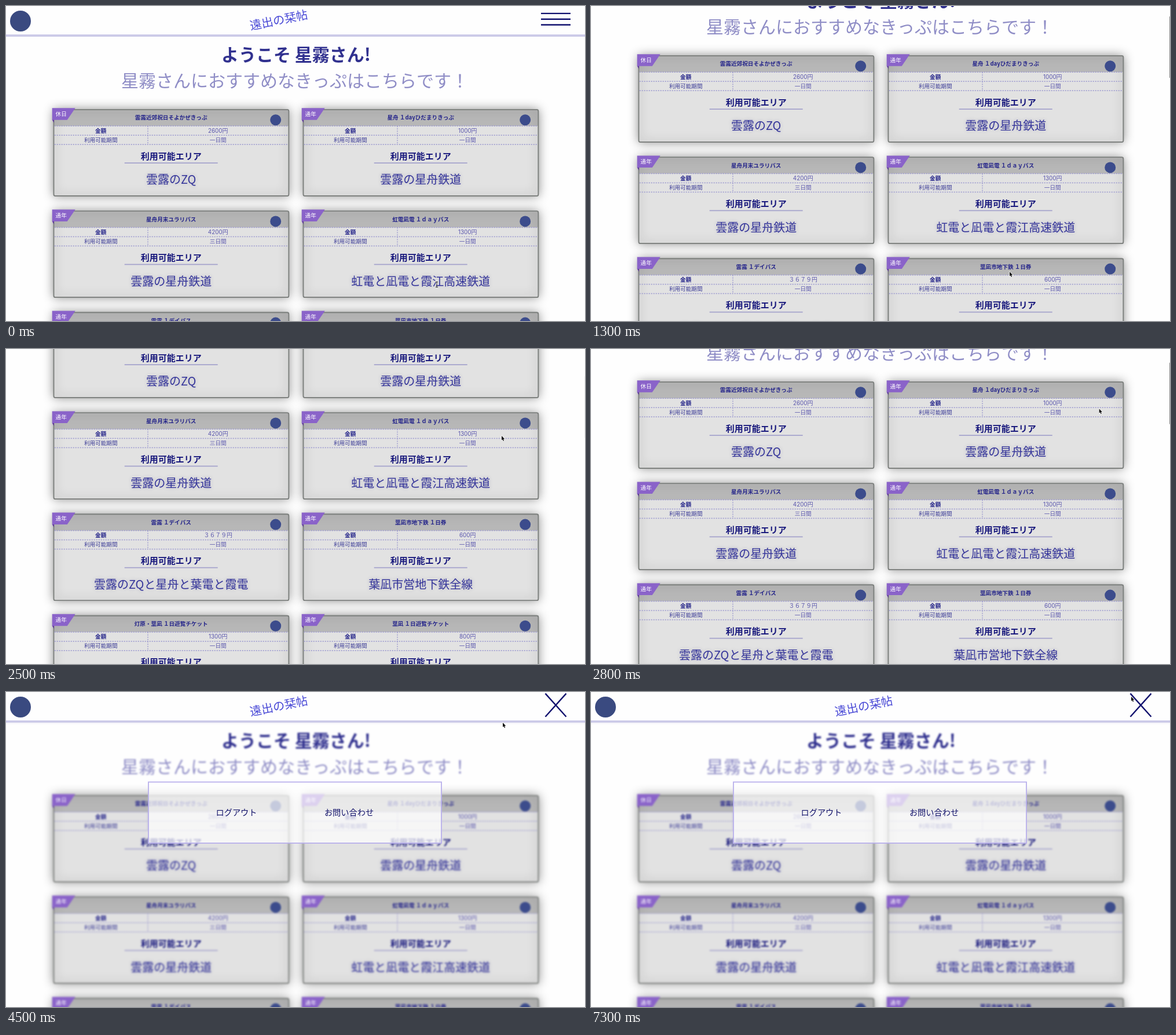
Recreate the animation shown at these times as an HTML page with a canvas. Size 1000 px wide and 544 px high, loop 7.4 s.

```html
<!DOCTYPE html>
<html lang="ja">
<head>
<meta charset="utf-8">
<title>きっぷ案内</title>
<style>
html, body { margin: 0; width: 100%; height: 100%; overflow: hidden; background: #fefefe; }
canvas { display: block; width: 1000px; height: 544px; }
</style>
</head>
<body>
<canvas id="stage" width="1000" height="544"></canvas>
<script>
const W = 1000, H = 544, LOOP = 7400, STEP = 100;
const PAGE_H = 900, CONTENT_H = 2800, HEADER_H = 54;
const FONT = '"Noto Sans CJK JP", "Noto Sans CJK", sans-serif';
const VALUE_FONT = `Inter, ${FONT}`;
const NAVY = '#17177c', INK = '#34349a', BORDER = '#7d807e', DOTS = '#9d9bcf';

const stage = document.getElementById('stage').getContext('2d');

// badge, title, price, period, area
const tickets = [
  ['休日', '雲露近郊祝日そよかぜきっぷ', '2600円', '一日間', '雲露のZQ'],
  ['通年', '星舟 １dayひだまりきっぷ', '1000円', '一日間', '雲露の星舟鉄道'],
  ['通年', '星舟月末ユラリパス', '4200円', '三日間', '雲露の星舟鉄道'],
  ['通年', '虹電凪電 １ｄａｙパス', '1300円', '一日間', '虹電と凪電と霞江高速鉄道'],
  ['通年', '雲露 １デイパス', '３６７９円', '一日間', '雲露のZQと星舟と葉電と霞電'],
  ['通年', '葉凪市地下鉄 １日券', '600円', '一日間', '葉凪市営地下鉄全線'],
  ['通年', '灯原・葉凪 １日遊覧チケット', '1300円', '一日間', '葉電全線'],
  ['通年', '葉凪 １日遊覧チケット', '800円', '一日間', '葉凪市内と葉電全線']
];

// [time, value...] with eased travel between the keys
const scrollKeys = [[1000, 0], [1100, 12], [1300, 93], [1700, 273], [1800, 288],
  [2000, 244], [2500, 244], [3100, 0], [3200, -0.8], [3300, 0]];
const cursorKeys = [[800, 744, 481], [1000, 723, 459], [1900, 723, 459], [2500, 856, 150],
  [3200, 911, 31], [3600, 948, 22], [4000, 948, 22], [4500, 858, 53], [5100, 590, 208],
  [5700, 400, 210], [6300, 600, 190], [6900, 945, 20], [7300, 933, 8]];
const barKeys = [[900, 0], [1000, 1], [2100, 1], [2500, 0.12], [2600, 1], [3300, 1], [3600, 0]];
const menuKeys = [[3800, 0], [4300, 1]];

function sample(keys, t, ease = u => u) {
  if (t <= keys[0][0]) return keys[0].slice(1);
  const i = keys.findIndex(k => k[0] > t);
  if (i < 0) return keys[keys.length - 1].slice(1);
  const a = keys[i - 1], b = keys[i];
  const u = ease((t - a[0]) / (b[0] - a[0]));
  return a.slice(1).map((v, n) => v + (b[n + 1] - v) * u);
}
const smooth = u => u * u * (3 - 2 * u);

function text(c, str, x, y, size, color, weight = 400, family = FONT) {
  c.font = `${weight} ${size}px ${family}`;
  c.textAlign = 'center';
  c.fillStyle = color;
  c.fillText(str, x, y + size * 0.38);
}

function line(c, x1, y1, x2, y2, color, width, dash = []) {
  c.strokeStyle = color;
  c.lineWidth = width;
  c.setLineDash(dash);
  c.beginPath();
  c.moveTo(x1, y1);
  c.lineTo(x2, y2);
  c.stroke();
  c.setLineDash([]);
}

function tracePolygon(c, points) {
  c.beginPath();
  points.forEach(([x, y]) => c.lineTo(x, y));
  c.closePath();
}

function polygon(c, color, points) {
  c.fillStyle = color;
  tracePolygon(c, points);
  c.fill();
}

function disc(c, x, y, r, color) {
  c.fillStyle = color;
  c.beginPath();
  c.arc(x, y, r, 0, Math.PI * 2);
  c.fill();
}

function drawCardFrame(c, w, h) {
  const outline = new Path2D();
  outline.roundRect(0, 0, w, h, 3);

  c.save();
  c.shadowColor = 'rgba(0,0,0,.45)';
  c.shadowBlur = 18;
  c.fillStyle = '#e2e2e2';
  c.fill(outline);
  c.restore();

  c.fillStyle = '#b7b7b7';
  c.fillRect(1, 1, w - 2, 28);

  // inset shadow
  c.save();
  c.clip(outline);
  c.shadowColor = 'rgba(0,0,0,.3)';
  c.shadowBlur = 18;
  c.strokeStyle = BORDER;
  c.lineWidth = 3;
  c.strokeRect(0, 0, w, h);
  c.restore();

  c.strokeStyle = BORDER;
  c.lineWidth = 1.6;
  c.beginPath();
  c.roundRect(0.8, 0.8, w - 1.6, h - 1.6, 3);
  c.stroke();
}

function drawCard(c, [badge, title, price, period, area], x, y) {
  const w = 407.5, h = 150.5, mid = 203.5;
  c.save();
  c.translate(x, y);
  drawCardFrame(c, w, h);

  for (const ly of [29, 45, 61]) line(c, 2, ly, w - 2, ly, DOTS, 1.6, [2, 2]);
  line(c, 163.3, 29, 163.3, 61, DOTS, 1.4, [2, 2]);

  text(c, title, mid, 14.5, 9.6, '#25258a', 700);
  text(c, '金額', 82, 36.7, 9.6, '#25258a', 700);
  text(c, '利用可能期間', 82, 52.9, 9.6, '#3a3a96', 500);
  text(c, price, 284.5, 36.7, 9.9, '#5a56ad', 400, VALUE_FONT);
  text(c, period, 284.5, 52.9, 9.6, '#5a56ad');
  text(c, '利用可能エリア', mid, 80.7, 15, NAVY, 700);
  line(c, 123, 93, 284, 93, '#a5a3cc', 1.8);

  c.shadowColor = 'rgba(60,60,110,.25)';
  c.shadowBlur = 6;
  text(c, area, mid, 121.5, 20, INK);
  c.shadowColor = 'transparent';

  disc(c, 384, 18.5, 9.5, '#3c4c8c');

  polygon(c, '#5a2f9e', [[-2, 18], [1, 18], [1, 23.5]]);
  polygon(c, '#8a63c9', [[-2, -2], [38, -2], [24, 18.5], [-2, 18.5]]);
  text(c, badge, 13.5, 8, 9.6, '#fff', 500);
  c.restore();
}

function drawPage() {
  const layer = document.createElement('canvas');
  layer.width = W;
  layer.height = PAGE_H;
  const c = layer.getContext('2d');
  c.fillStyle = '#fefefe';
  c.fillRect(0, 0, W, PAGE_H);

  disc(c, 25, 26, 18, '#3a4a80');
  c.save();
  c.translate(471, 24);
  c.rotate(-0.197);
  text(c, '遠出の栞帖', 0, 0, 20.3, '#4848d6', 500);
  c.restore();
  line(c, 0, 50.3, W, 50.3, '#9c98d2', 1.3);
  line(c, 0, 52.5, W, 52.5, '#b3b0dc', 1.1);

  text(c, 'ようこそ 星霧さん!', 501, 84, 30, '#31318f', 700);
  text(c, '星霧さんにおすすめなきっぷはこちらです！', 499, 128.5, 30, '#8f8dc6');
  tickets.forEach((ticket, i) =>
    drawCard(c, ticket, 81.7 + (i % 2) * 431, 178.2 + (i >> 1) * 175.2));
  return layer;
}

function drawToggle(k, scroll) {
  const c = stage, half = 25.5 + 1.5 * k, gap = 9.8 * (1 - k);
  for (const side of [-1, 0, 1]) {
    c.save();
    c.translate(949.5, 22.7 - scroll + side * gap);
    c.rotate(-side * 0.84 * k);
    c.globalAlpha = side ? 1 : 1 - k;
    line(c, -half, 0, half, 0, '#10106e', 2.4);
    c.restore();
  }
}

function drawMenu(k) {
  const c = stage;
  c.save();
  c.globalAlpha = k;
  c.fillStyle = 'rgba(255,255,255,.7)';
  c.fillRect(246, 155, 506, 106);
  c.strokeStyle = '#b9b0ec';
  c.lineWidth = 1.8;
  c.strokeRect(246, 155.5, 506, 105.5);
  text(c, 'ログアウト', 398, 207.5, 14.2, '#12126a');
  text(c, 'お問い合わせ', 592.5, 207.5, 14.2, '#12126a');
  c.restore();
}

function drawCursor(x, y, beam) {
  const c = stage;
  c.save();
  c.translate(x, y);
  if (beam) {
    line(c, 0, -4, 0, 4, '#333', 1);
    line(c, -2, -4.5, 2, -4.5, '#333', 1);
    line(c, -2, 4.5, 2, 4.5, '#333', 1);
  } else {
    const arrow = [[0, 0], [0, 7.6], [1.7, 6.2], [2.9, 9], [4.2, 8.4], [3, 5.8], [5.3, 5.6]];
    c.lineJoin = 'round';
    c.strokeStyle = '#fff';
    c.lineWidth = 1.4;
    tracePolygon(c, arrow);
    c.stroke();
    polygon(c, '#111', arrow);
  }
  c.restore();
}

const page = drawPage();

function render(t) {
  const c = stage;
  const [scroll] = sample(scrollKeys, t);
  const [bar] = sample(barKeys, t);
  const [menu] = sample(menuKeys, t, smooth);
  const [x, y] = sample(cursorKeys, t, smooth);

  c.fillStyle = '#fefefe';
  c.fillRect(0, 0, W, H);
  c.drawImage(page, 0, -scroll);
  if (menu > 0) {
    c.save();
    c.beginPath();
    c.rect(0, HEADER_H, W, H - HEADER_H);
    c.clip();
    c.filter = `blur(${(1.8 * menu).toFixed(2)}px)`;
    c.drawImage(page, 0, -scroll);
    c.restore();
    drawMenu(menu);
  }
  drawToggle(menu, scroll);

  if (bar > 0) {
    c.fillStyle = `rgba(110,110,110,${bar * 0.8})`;
    const top = scroll * H / CONTENT_H;
    c.fillRect(999, Math.max(0, top), 1, 106);
  }
  drawCursor(x, y, t < 900);
}

function tick() {
  const t = performance.now() % LOOP;
  render(Math.floor(t / STEP) * STEP);
  requestAnimationFrame(tick);
}
tick();
</script>
</body>
</html>
```
